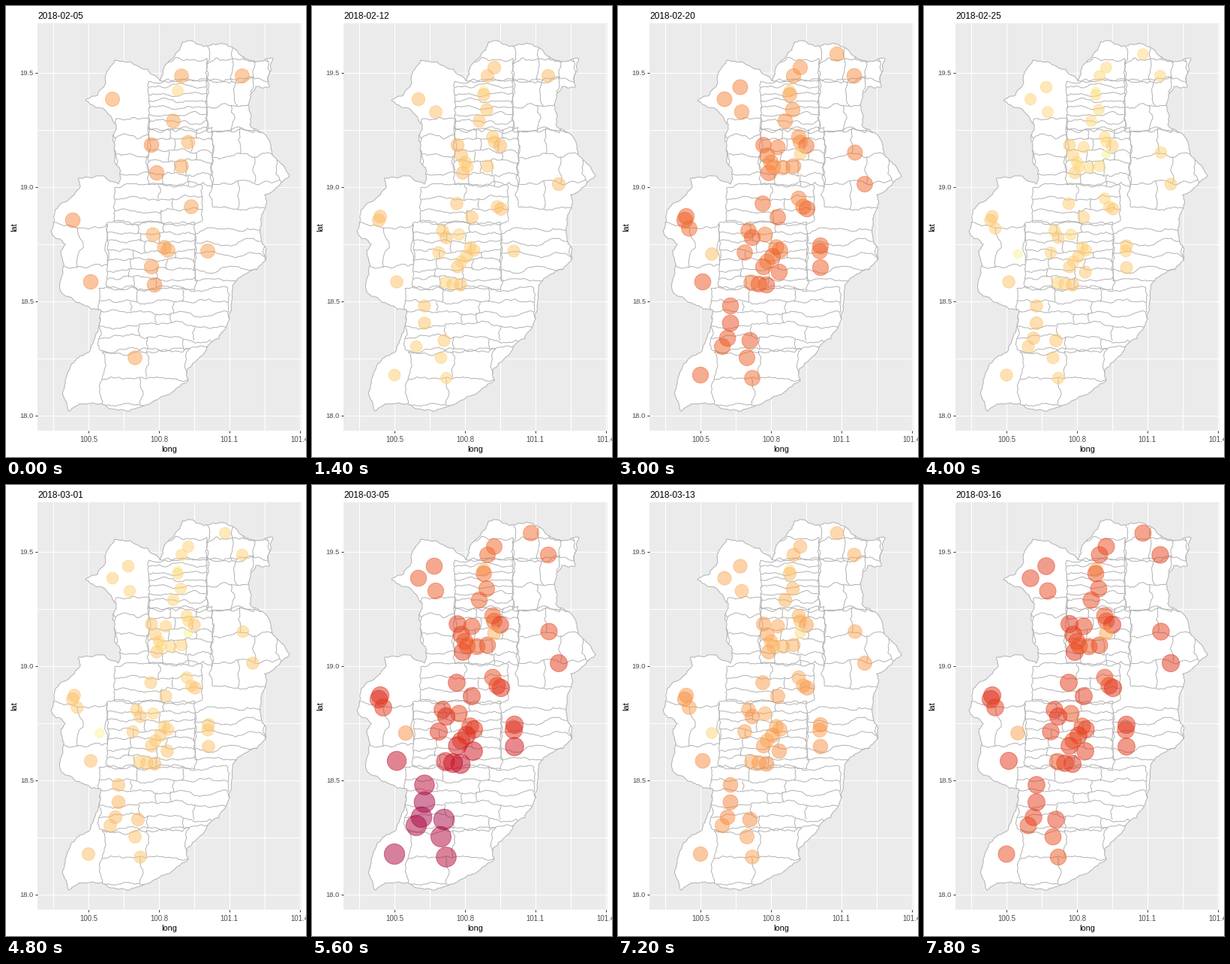
A matplotlib script for the animation above (8 s loop, 400 by 600 pixels).

```python
import numpy as np
import matplotlib.pyplot as plt
from matplotlib.animation import FuncAnimation
from matplotlib.collections import LineCollection
from matplotlib.patches import Polygon, Rectangle

PX = 0.72  # points per pixel at 100 dpi
DAYS, STEP = 40, 200
GREY = "#b2b2b2"
plt.rcParams["font.family"] = "Liberation Sans"
rng = np.random.default_rng(4)

# Corners of the province, clockwise from the northern tip
OUTLINE = [
    (235, 48), (264, 54), (281, 51), (318, 69), (356, 70), (349, 98),
    (351, 108), (333, 107), (323, 132), (325, 158), (348, 174), (353, 190),
    (378, 226), (355, 247), (345, 251), (343, 275), (340, 309), (346, 338),
    (318, 357), (302, 372), (298, 410), (292, 430), (271, 450), (241, 484),
    (243, 498), (213, 518), (190, 530), (174, 535), (127, 529), (103, 529),
    (84, 539), (76, 512), (84, 485), (112, 459), (122, 434), (126, 404),
    (103, 397), (73, 380), (77, 345), (73, 325), (79, 317), (60, 300),
    (73, 263), (99, 240), (97, 229), (130, 226), (150, 237), (153, 219),
    (145, 187), (147, 157), (132, 138), (106, 126), (133, 103), (145, 72),
    (167, 75), (206, 100), (211, 80), (232, 58)]

# District blocks: left, right, top, bottom, rows, columns
BLOCKS = [
    (205, 268, 72, 98, 1, 1), (268, 350, 48, 98, 2, 3),
    (268, 330, 98, 166, 2, 2), (190, 268, 98, 164, 7, 1),
    (146, 190, 150, 222, 3, 1), (190, 275, 164, 238, 5, 3),
    (275, 365, 164, 268, 3, 2), (145, 262, 238, 288, 3, 2),
    (135, 252, 288, 376, 7, 3), (252, 345, 300, 366, 4, 1),
    (62, 135, 292, 345, 1, 2), (124, 296, 376, 458, 5, 3),
    (128, 245, 458, 530, 2, 2)]

# Stations, in the order in which they start to report
STATIONS = [
    (315, 93), (142, 124), (234, 93), (229, 113), (223, 153), (243, 181),
    (194, 185), (201, 222), (234, 213), (247, 267), (89, 285), (196, 304),
    (211, 321), (216, 325), (269, 326), (194, 347), (113, 367), (198, 371),
    (172, 468),
    (243, 82), (165, 141), (229, 118), (233, 138), (241, 174), (251, 186),
    (199, 199), (204, 208), (207, 214), (329, 237), (193, 263), (252, 270),
    (213, 281), (91, 280), (174, 299), (179, 308), (169, 328), (206, 333),
    (199, 340), (178, 368), (188, 370), (150, 399), (150, 422), (176, 445),
    (139, 453), (110, 491), (179, 495),
    (292, 64), (163, 108), (243, 197), (213, 188), (220, 215), (316, 195),
    (241, 256), (270, 319), (270, 348), (125, 330), (146, 442), (95, 296),
    (215, 354)]
CLEAN_AIR = [(229, 113), (243, 197), (125, 330)]
xy = np.array(STATIONS)
N = len(xy)

# Dot radius in the north, middle and south on turning-point days
BANDS = [80, 320, 430]
LEVELS = {
    0: (9.8, 10, 10), 7: (9, 8.6, 8.4), 15: (10.1, 10.9, 11.2),
    18: (8.2, 8.7, 9.1), 20: (7.8, 8.3, 8.7), 24: (8, 8.5, 9),
    28: (10.9, 12, 14.2), 32: (6.3, 7.4, 8.3), 39: (11.5, 11.8, 11.6)}
JOINED = {0: 19, 7: 46, 15: N}

# Dot colour by radius
RAMP_R = [4.5, 5.5, 6.5, 8, 9, 10, 11, 12, 13, 15]
RAMP = np.array([
    (165, 208, 120), (235, 243, 150), (255, 243, 145), (254, 212, 118),
    (253, 188, 100), (250, 155, 75), (240, 98, 38), (226, 52, 26),
    (202, 12, 32), (150, 0, 85)]) / 255


def rough(points, sway, rounds):
    """Subdivide a path, shifting each midpoint sideways."""
    p = np.array(points, float)
    for _ in range(rounds):
        a, b = p[:-1], p[1:]
        side = (b - a)[:, ::-1] * [1, -1]
        mid = (a + b) / 2 + side * rng.uniform(-sway, sway, (len(a), 1))
        out = np.empty((len(p) + len(mid), 2))
        out[::2], out[1::2] = p, mid
        p = out
    return p


def districts(left, right, top, bottom, rows, cols):
    """Borders of a wavy brick pattern that fills a block."""
    h, w = (bottom - top) / rows, (right - left) / cols
    xs = np.linspace(left, right, 2 * cols + 2)
    levels = np.linspace(top, bottom, rows + 1)
    waves = [y + rng.uniform(-.25, .25, len(xs)) * min(h, 16) for y in levels]
    paths = [np.column_stack([xs, ys]) for ys in waves]
    for upper, lower in zip(waves, waves[1:]):
        joints = left + w * (np.arange(1, cols) + rng.uniform(-.35, .35, cols - 1))
        for x in [left, *joints, right]:
            paths.append([(x, np.interp(x, xs, upper)),
                          (x, np.interp(x, xs, lower))])
    return [rough(p, .16, 3) for p in paths]


def curve(day, table):
    days = list(table)
    return np.array([np.interp(day, days, c) for c in zip(*table.values())])


def date(day):
    n = 5 + day
    return f"2018-02-{n:02d}" if n <= 28 else f"2018-03-{n - 28:02d}"


fig = plt.figure(figsize=(4, 6), dpi=100, facecolor="white")
ax = fig.add_axes([0, 0, 1, 1])
ax.set(xlim=(0, 400), ylim=(600, 0))
ax.axis("off")


def label(x, y, s, size, color="black", **kw):
    return ax.text(x, y, s, fontsize=size * PX, color=color, **kw)


ax.add_patch(Rectangle((42, 23), 352, 542, fc="#ebebeb", ec="none", zorder=0))
xs = 110 + 93.9 * np.arange(4)
ys = 88.5 + 152 * np.arange(4)
ax.vlines([*xs, *(xs - 46.95)], 23, 565, color="white", lw=PX, zorder=1)
ax.hlines([*ys, *(ys[1:] - 76)], 42, 394, color="white", lw=PX, zorder=1)
ax.vlines(xs, 565, 568, color="#333333", lw=PX)
ax.hlines(ys, 39, 42, color="#333333", lw=PX)
for i in range(4):
    label(xs[i], 579.5, f"{100.5 + .3 * i:.1f}", 9.7, "#4d4d4d", ha="center")
    label(37, ys[i] + 3.5, f"{19.5 - .5 * i:.1f}", 9.4, "#4d4d4d", ha="right")
label(218, 593, "long", 11, ha="center")
label(11, 294, "lat", 11, ha="center", va="center", rotation=90)
title = label(42, 17, "", 11.9)

land = Polygon(rough(OUTLINE + OUTLINE[:1], .14, 4), fc="white", ec=GREY,
               lw=PX, zorder=2)
ax.add_patch(land)
borders = LineCollection([p for b in BLOCKS for p in districts(*b)],
                         colors=GREY, linewidths=PX, zorder=3)
ax.add_collection(borders)
borders.set_clip_path(land)

dots = ax.scatter(xy[:, 0], xy[:, 1], lw=PX, zorder=4)
offset = rng.uniform(-.4, .4, N)
offset[[STATIONS.index(p) for p in CLEAN_AIR]] = -2


def draw(day):
    r = np.interp(xy[:, 1], BANDS, curve(day, LEVELS)) + offset
    on = np.arange(N) < np.interp(day, list(JOINED), list(JOINED.values()))
    rgba = np.column_stack([np.interp(r, RAMP_R, c) for c in RAMP.T] + [on * .5])
    dots.set_sizes(((2 * r - 1) * PX) ** 2 * on)
    dots.set_facecolors(rgba)
    dots.set_edgecolors(rgba)
    title.set_text(date(day))
    return dots, title


anim = FuncAnimation(fig, draw, frames=DAYS, interval=STEP, repeat=True,
                     repeat_delay=0, blit=False)
plt.show()
```
